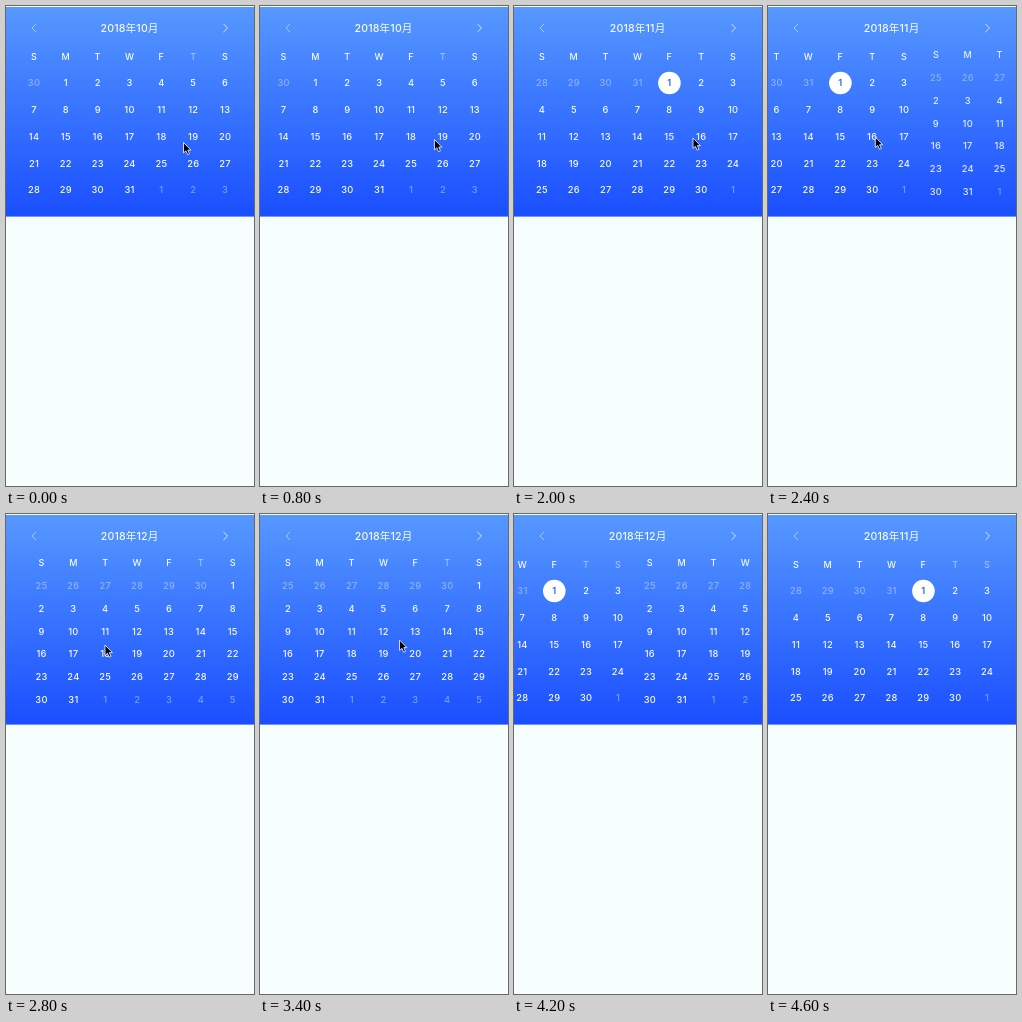
Write an HTML page that moves like this. It is 248 px wide and 480 px high and loops after 4.8 s.

```html
<!DOCTYPE html>
<html lang="zh">
<head>
<meta charset="utf-8">
<title>Calendar</title>
<style>
  html, body { margin: 0; width: 100%; height: 100%; overflow: hidden; background: #f7fffe; }
  svg { display: block; width: 248px; height: 480px; }
  text { font: 500 9.3px Inter, "Noto Sans", sans-serif; letter-spacing: .3px; fill: #f6fbff; text-anchor: middle; }
  .title { font: 500 10.6px Inter, "Noto Sans CJK SC", "Noto Sans CJK", sans-serif; letter-spacing: .15px; }
  .week { font-size: 9px; }
  .out { fill-opacity: .42; }
  .dim { fill-opacity: .5; }
  .today { fill: #2a66e8; font-weight: 600; }
  .arrow { fill: none; stroke: #fff; stroke-width: 1; stroke-linecap: round; stroke-linejoin: round; }
</style>
</head>
<body>
<svg viewBox="0 0 248 480">
  <defs>
    <linearGradient id="sky" x1="0" y1="0" x2="0" y2="1">
      <stop offset="0" stop-color="#5698ff"/>
      <stop offset="1" stop-color="#1a4eff"/>
    </linearGradient>
  </defs>
  <rect y="1" width="248" height="209.6" fill="url(#sky)"/>
  <path class="arrow" d="M29.8 18.2 L26 22 L29.8 25.8" opacity=".5"/>
  <path class="arrow" d="M217.7 18.2 L221.5 22 L217.7 25.8" opacity=".75"/>
  <text class="title" id="title" x="123.6" y="25.8"></text>
  <g id="pages"></g>
  <path id="cursor" d="M0 0 V10.4 L2.4 8.3 L4.2 12.2 L6 11.4 L4.3 7.6 H7.4 Z"
        fill="#000" stroke="#fff" stroke-width=".8" stroke-linejoin="round"/>
</svg>
<script>
const $ = id => document.getElementById(id);
const LOOP = 4800, STEP = 200, PAGE = 223, COL = PAGE / 7;
const FIRST = 9; // October, zero-based
const clamp = v => Math.max(0, Math.min(1, v));

function add(parent, tag, attrs, text) {
  const el = document.createElementNS('http://www.w3.org/2000/svg', tag);
  for (const k in attrs) el.setAttribute(k, attrs[k]);
  if (text !== undefined) el.textContent = text;
  return parent.appendChild(el);
}

function buildPage(month) {
  const g = add($('pages'), 'g', {});
  const lead = new Date(2018, month, 1).getDay();
  const length = new Date(2018, month + 1, 0).getDate();
  const rows = Math.ceil((lead + length) / 7);
  const [headY, rowY, pitch] = rows === 6 ? [48.4, 71.2, 22.95] : [50.3, 77, 26.75];
  const colX = c => 28 + c * COL;

  const heads = [...'SMTWFTS'].map((d, c) => add(g, 'text',
    { x: colX(c), y: headY + 3.3, class: c === 5 ? 'week dim' : 'week' }, d));

  for (let i = 0; i < rows * 7; i++) {
    const date = new Date(2018, month, 1 - lead + i);
    const x = colX(i % 7), y = rowY + Math.floor(i / 7) * pitch;
    const inside = date.getMonth() === month;
    const today = inside && month === 10 && date.getDate() === 1;
    if (today) add(g, 'circle', { cx: x, cy: y, r: 11.3, fill: '#fff' });
    add(g, 'text', { x, y: y + 3.4, class: today ? 'today' : inside ? '' : 'out' }, date.getDate());
  }
  return { g, heads };
}

const pages = [0, 1, 2].map(i => buildPage(FIRST + i));

// Each swipe is an S-curve around its middle time, trimmed so it starts and ends at rest
const swipes = [
  { mid: 1057, tau: 80, dir: 1 },
  { mid: 2459, tau: 118, dir: 1 },
  { mid: 4205, tau: 80, dir: -1 }
];
const swiped = (t, { mid, tau, dir }) =>
  dir * clamp((1 / (1 + Math.exp((mid - t) / tau)) - .02) / .96);

// Pointer stops: time, x, y
const stops = [
  [0, 177.5, 136.5], [700, 183, 134], [1000, 150, 132], [1200, 159, 132],
  [2000, 179, 132], [2500, 99, 131], [2800, 99, 131], [3400, 139.5, 126]
];
const LIFT = 4100; // pointer leaves

function pointerAt(t) {
  const i = stops.findIndex(s => s[0] > t);
  if (i < 0) return stops[stops.length - 1].slice(1);
  const [t0, x0, y0] = stops[i - 1], [t1, x1, y1] = stops[i];
  const k = (t - t0) / (t1 - t0), e = k * k * (3 - 2 * k);
  return [x0 + (x1 - x0) * e, y0 + (y1 - y0) * e];
}

function draw(t) {
  const pos = swipes.reduce((sum, s) => sum + swiped(t, s), 0);
  pages.forEach(({ g }, i) => {
    const off = i - pos;
    g.setAttribute('transform', `translate(${off * PAGE} 0)`);
    g.setAttribute('opacity', clamp((1 - Math.abs(off)) * 2.6 - .07));
  });
  const returning = t > swipes[1].mid;
  pages[1].heads[6].classList.toggle('dim', returning);
  pages[1].heads[5].classList.toggle('dim', returning);
  $('title').textContent = `2018年${FIRST + 1 + Math.round(pos)}月`;

  $('cursor').setAttribute('visibility', t < LIFT ? 'visible' : 'hidden');
  $('cursor').setAttribute('transform', `translate(${pointerAt(t)})`);
}

const start = performance.now();
function tick() {
  const t = (performance.now() - start) % LOOP;
  draw(Math.floor(t / STEP) * STEP);
  requestAnimationFrame(tick);
}
tick();
</script>
</body>
</html>
```
